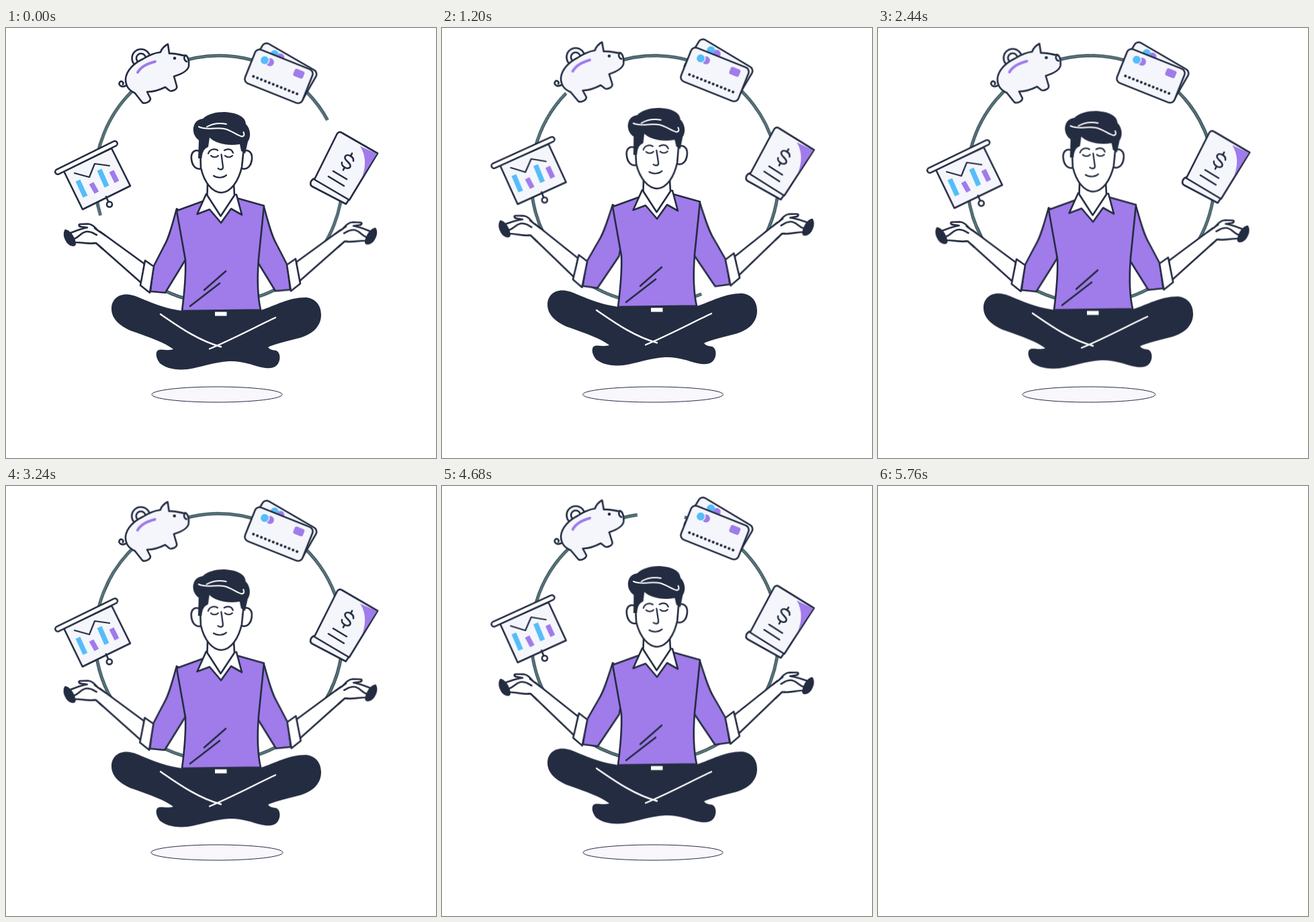
An HTML page for the animation above (5800 ms loop, 640 by 640 pixels).

```html
<!DOCTYPE html>
<html lang="en">
<head>
<meta charset="utf-8">
<title>Balanced finances</title>
<style>
  html, body { margin: 0; width: 100%; height: 100%; overflow: hidden; background: #fff; }
  svg { display: block; width: 100vw; height: 100vh; }

  #scene { animation: blink 5.8s step-end infinite; }
  @keyframes blink { 0% { visibility: visible; } 99.3103% { visibility: hidden; } }

  #ring { transform-origin: 316.8px 225.3px; animation: spin 5.8s linear infinite; }
  @keyframes spin { from { transform: rotate(-90deg); } to { transform: rotate(270deg); } }
  #ring circle { stroke-dasharray: 61.3 22 156.3 13.4 107 0; }

  /* Everything that floats shares one rise and fall; each part sets its own shift and tilt. */
  .bob { --y: 0px; --r: 0deg; --s: 1; animation: bob 1.45s cubic-bezier(.36, 0, .64, 1) infinite alternate; }
  @keyframes bob {
    from { transform: translateY(0px) rotate(0deg) scaleX(1); }
    to { transform: translateY(var(--y)) rotate(var(--r)) scaleX(var(--s)); }
  }
  #shadow { --s: 1.083; transform-origin: 314px 545px; }
  #body { --y: -6.5px; }
  #head { --r: -1.4deg; transform-origin: 320px 245px; }
  .arm { --r: 2.8deg; transform-origin: 255px 270px; }
  #pig { --y: -2px; --r: -2deg; transform-origin: 205px 110px; }
  #chart { --y: -7.8px; --r: 2deg; transform-origin: 130px 225px; }
  #book { --y: -7.2px; --r: 2deg; transform-origin: 503px 208px; }
  #front { --y: -3px; }
  #back { --y: -6px; --r: 1deg; transform-origin: 411px 66px; }

  .ink { stroke: #242c41; stroke-width: 2.6; stroke-linejoin: round; stroke-linecap: round; fill: none; }
  .pale { fill: #f4f6fc; }
  .white { fill: #fff; }
  .dark { fill: #242c41; }
  .violet { fill: #a07bea; }
  .sky { fill: #55bdf8; }
  .chalk { stroke: #fff; stroke-width: 2.4; stroke-linecap: round; fill: none; }
  .bar { stroke-width: 7.5; }
</style>
</head>
<body>
<svg viewBox="0 0 640 640">
  <defs>
    <g id="limb">
      <path class="ink white" d="M140 303 L206 351 L202 380 L134 320 Z"/>
      <path class="ink white" d="M139 304 C132 296 128 291.5 122 291.5 L110 292 C107 293 109 296 113 296 L121 297 C113 298 104 302 96 305 L102 319 C114 319 124 322 134 320"/>
      <path class="white" d="M134 301 L146 309 L140 324 L130 318 Z"/>
      <path class="ink" d="M132 298 L148 309 M130 320 L134 320 L144 329"/>
      <path class="ink" d="M101 314 C110 311 112 303 121 303 C128 303 131 306 135 308"/>
      <path class="ink dark" stroke-width="1" d="M88.5 301 C84.5 308 90 322 99 323.5 C104 324 103 320 101.5 315 C98 307 93 302 88.5 301 Z"/>
      <path class="ink violet" d="M254 269 C247 294 243 311 236 323 L219 356 L215 392 L237 394 L267 345 L275 285 Z"/>
      <path class="ink white" d="M207 346 L220 355 L214 394 L200 383 Z"/>
    </g>
  </defs>

  <g id="scene">
    <g id="ring" fill="none">
      <circle cx="316.8" cy="225.3" r="184.2" pathLength="360" stroke="#2a3648" stroke-width="4.6"/>
      <circle cx="316.8" cy="225.3" r="184.2" pathLength="360" stroke="#56807f" stroke-width="2.4"/>
    </g>

    <ellipse id="shadow" class="bob" cx="314" cy="545.5" rx="97" ry="11.5" fill="#f9f7fb" stroke="#242c41" vector-effect="non-scaling-stroke"/>

    <g id="pig" class="bob">
      <circle class="ink pale" cx="201" cy="45" r="13.5"/>
      <circle class="ink white" cx="201" cy="45" r="7"/>
      <path class="ink" d="M178 86 C172 89 167 85 169 81 C171 78 176 80 174 84"/>
      <path class="ink pale" d="M178 76 C179 63 191 52 204 46 C212 41 221 37 230 36 C232 30 237 26 241 24 L243 38 C252 37 258 40 265 41 C270 39 273 47 272 57 C270 65 260 69 250 72 L254 86 C256 92 246 95 243 93 L237 88 C227 93 218 95 210 95 L215 105 C215 110 207 113 203 111 L192 97 C182 92 178 86 178 76 Z"/>
      <path class="ink" d="M266 42 C264 45 266 49 269 50"/>
      <path d="M196 66 C200 59 210 53 222 50" fill="none" stroke="#a07bea" stroke-width="4" stroke-linecap="round"/>
      <circle class="dark" cx="251" cy="45" r="2.3"/>
    </g>

    <g id="back" class="bob">
      <g transform="translate(411.5 66.5) rotate(30)">
        <rect class="ink pale" x="-46" y="-27" width="92" height="54" rx="7"/>
        <circle class="violet" cx="-14" cy="-18" r="6"/>
        <circle class="sky" cx="-24" cy="-18" r="6"/>
      </g>
    </g>
    <g id="front" class="bob">
      <g transform="translate(406 72) rotate(21.8)">
        <rect class="ink pale" x="-46" y="-27" width="92" height="54" rx="7"/>
        <circle class="violet" cx="-20" cy="-14.7" r="6"/>
        <circle class="sky" cx="-28.4" cy="-14.5" r="6.6" stroke="#f4f6fc" stroke-width="1.4"/>
        <rect class="violet" x="18.5" y="-20.5" width="15.5" height="11.5" rx="3"/>
        <path class="ink" d="M-35 14.1 H36" style="stroke-width:4.2;stroke-dasharray:0 6.35"/>
      </g>
    </g>

    <g id="book" class="bob">
      <path class="ink pale" d="M459 224 C452 227 452 234 456 236 L506 262 L514 250 Z"/>
      <path class="ink pale" d="M493 157 Q496 153.500 500 156 L553 186.500 L511 256 L459 225.500 Z"/>
      <path class="violet" d="M527 176 L552 187 L530 222 C536 206 536 190 527 176 Z"/>
      <path class="ink" d="M487 213 L507 225 M480 221 L503 235"/>
      <path class="ink" transform="translate(508.500 199) rotate(28)" d="M7 -5 C5 -11 -7 -11 -7 -5 C-7 1 7 -1 7 5 C7 11 -6 11 -7 5 M0 -14 V-9.500 M0 9.500 V14"/>
    </g>

    <g id="chart" class="bob">
      <path class="ink pale" d="M86 213 L157 179 L185 235 L114 270 Z"/>
      <path class="ink" d="M77 214 L162 172" style="stroke-width:10"/>
      <path class="chalk" d="M77 214 L162 172" style="stroke-width:5"/>
      <path class="ink" d="M102 216 L124 222 L132 202 L154 205" style="stroke-width:2.2"/>
      <path class="bar" stroke="#55bdf8" d="M107 227 L118 251 M139 211 L150 236"/>
      <path class="bar" stroke="#a07bea" d="M127 231 L135 245 M157 213 L165 229"/>
      <path class="ink" d="M149 251 L152 258"/>
      <circle class="ink white" cx="154" cy="262.500" r="4"/>
    </g>

    <g id="body" class="bob">
      <g class="bob arm"><use href="#limb"/></g>
      <g transform="translate(638 -2.500) scale(-1 1)"><g class="bob arm"><use href="#limb"/></g></g>

      <path class="dark" d="M180 396.500 C198 397 216 414 262 421 L379 420 C402 413 420 401 446 401 C460 402 469 412 469 427 C469 445 455 456 438 461 C420 466 400 470 390 475 C393 480 399 479 403 480.500 C409 484 409 496 403 502 C398 507 390 507 380 505 C365 501 350 495 332 496 C310 497 290 505 270 508 C250 510 236 505 229 499 C222 490 222 480 228 479 C234 478 240 481 249 478 C236 468 215 461 190 452 C170 445 157 433 157 418 C157 405 166 396 180 396.500 Z"/>
      <path class="chalk" d="M230 426 C255 443 285 465 320 474.500 M401 431 C375 443 340 462 303 477.500"/>
      <rect class="white" x="311" y="422.500" width="17.500" height="6"/>

      <path class="ink violet" d="M254 272 L298 256 L343 253 L384 264.500 L376 343 C374 370 374 398 379 419.500 L262 421 C265 398 268 370 267 345 Z"/>
      <path class="ink" d="M274 414 L318 380 M295 390 L327 362"/>
      <path class="ink white" d="M298 247 L284.500 277 L303 270 L320 290 L335 269 L351 278 L343 248 Z"/>
      <path class="ink white" d="M300 232 L299.500 249 L319.500 280 L340 249 L339 232"/>

      <g id="head" class="bob">
        <path class="ink white" d="M290 184 C280 179 275 186 276 195 C277 205 283 212 291 209"/>
        <path class="ink white" d="M352 184 C361 179 367 186 366 195 C365 205 359 212 351 209"/>
        <path class="ink white" d="M289 180 L290 208 C295 230 307 245 321 245 C335 244 346 228 351 207 L354 178 L340 160 L300 160 Z"/>
        <path class="dark" d="M286 194 L287 167 C280 162 278 154 279 148 C281 139 286 136 293 135 C300 128 312 125 325 125 C345 126 357 133 357 143 C364 150 365 162 360 169 L356 187 L350 183 L348 173 C330 176 312 172 303 163 L301 177 C294 180 292 186 291.500 194 Z"/>
        <path class="chalk" d="M287 147 C300 153 312 147 325 150 C335 152 344 160 351 161.500 C355 161 355 158 353.500 155 M299 147 C308 142 318 141 328 143" style="stroke-width:2"/>
        <path class="ink" style="stroke-width:2.2" d="M301 187 C303 180 311 179 315 182 M305 190 C308 193 313 193 316 190 M325 182 C330 179 336 180 338 186 M326 190 C329 193 334 193 337 190 M320.500 188 L323 207 C323 212 318 211 315.500 209 M309 220 C315 224 324 223 328 219"/>
      </g>
    </g>
  </g>
</svg>
</body>
</html>
```
